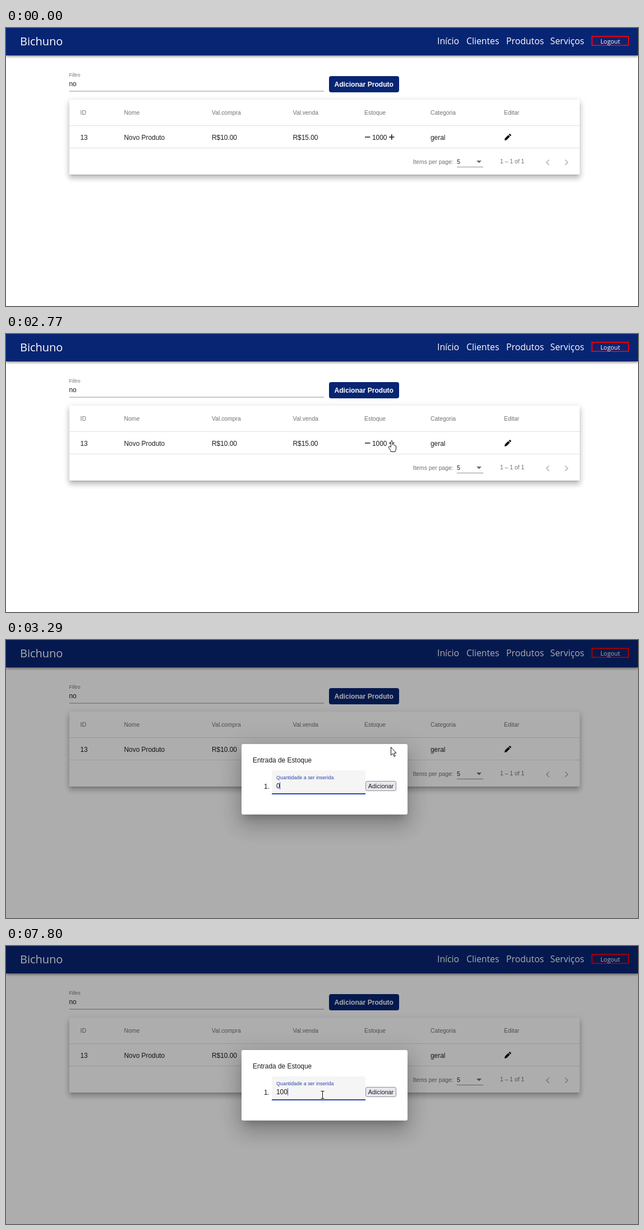
Recreate the animation shown at these times as an HTML page. Size 1127x497 px, loop 8000 ms.

```html
<!DOCTYPE html>
<html lang="pt-BR">
<head>
<meta charset="utf-8">
<title>Estoque</title>
<style>
  html, body { margin: 0; width: 100%; height: 100%; overflow: hidden; background: #fff; }
  div, svg { position: absolute; box-sizing: border-box; }
  svg { left: 0; top: 0; width: 1127px; height: 497px; }
  text { font: 11.9px "Liberation Sans", Arial, sans-serif; fill: #1c1c22; white-space: pre; }
  #nav { left: 0; top: 0; width: 1127px; height: 49px; background: #082573;
    box-shadow: 0 2px 4px rgba(0,0,0,.45); }
  #card { left: 113px; top: 128px; width: 910px; height: 134px; background: #fff; border-radius: 2px;
    box-shadow: 0 4px 4px -3px rgba(0,0,0,.2), 0 7px 9px 1px rgba(0,0,0,.14), 0 3px 12px 2px rgba(0,0,0,.12); }
  #dim { left: 0; top: 0; width: 1127px; height: 497px; background: rgba(0,0,0,.32); }
  #dialog { left: 0; top: 0; width: 1127px; height: 497px; transform-origin: 568px 249px; }
  #panel { left: 420px; top: 186px; width: 296px; height: 126px; background: #fff; border-radius: 3px;
    box-shadow: 0 10px 13px -6px rgba(0,0,0,.2), 0 21px 33px 3px rgba(0,0,0,.14), 0 8px 40px 7px rgba(0,0,0,.12); }
  .brand text, text.logout { font-family: "Open Sans", "Noto Sans", sans-serif; fill: #fff; }
  .brand text { font-size: 15.8px; }
  .brand text.title { font-size: 20px; }
  text.logout { font-size: 10.8px; }
  .head text { font-size: 10.4px; fill: #757075; }
  text.small { font-size: 8.95px; fill: #757075; }
  text.bold { font-size: 12.1px; font-weight: bold; fill: #fff; }
</style>
</head>
<body>
<div id="nav"></div>
<div id="card"></div>
<svg>
  <g class="brand">
    <text class="title" x="25" y="31">Bichuno</text>
    <text x="769" y="29">Início</text>
    <text x="821" y="29">Clientes</text>
    <text x="892" y="29">Produtos</text>
    <text x="970.5" y="29">Serviços</text>
  </g>
  <rect x="1045" y="15" width="65" height="16" fill="none" stroke="#e8000c" stroke-width="2"/>
  <text class="logout" x="1060" y="27.5">Logout</text>

  <text class="small" x="112.5" y="87">Filtro</text>
  <text x="112.5" y="104">no</text>
  <path d="M113 113H567" stroke="#8f8f8f"/>
  <rect x="576" y="86" width="125" height="29" rx="4" fill="#082573"/>
  <text class="bold" x="585.5" y="105">Adicionar Produto</text>

  <path d="M113 174.5H1023M113 214.5H1023" stroke="#e0e0e0"/>
  <g class="head">
    <text x="132.5" y="155">ID</text>
    <text x="210.5" y="155">Nome</text>
    <text x="367" y="155">Val.compra</text>
    <text x="511.5" y="155">Val.venda</text>
    <text x="639" y="155">Estoque</text>
    <text x="757" y="155">Categoria</text>
    <text x="888" y="155">Editar</text>
    <text x="725.5" y="243">Items per page:</text>
    <text x="881" y="242">1 – 1 of 1</text>
  </g>
  <text x="132.5" y="199.5">13</text>
  <text x="210.5" y="199.5">Novo Produto</text>
  <text x="367" y="199.5">R$10.00</text>
  <text x="511.5" y="199.5">R$15.00</text>
  <text x="653" y="199.5">1000</text>
  <text x="757" y="199.5">geral</text>
  <path d="M640 195H649.5M683 195H692.5M687.8 190.3V199.8" stroke="#1c1c22" stroke-width="1.7"/>
  <path d="M889 201L889.7 197.3 895.7 191.3 898.7 194.3 892.7 200.3ZM896.4 190.6L897.6 189.4Q898.5 188.8 899.4 189.6L900.5 190.7Q901.2 191.6 900.6 192.4L899.4 193.6Z" fill="#111"/>
  <text style="font-size:10.8px" x="804" y="243">5</text>
  <path d="M804 248.5H851" stroke="#8f8f8f"/>
  <path d="M839 237H848L843.5 241.5Z" fill="#7c666c"/>
  <path d="M968.5 235.5L963.8 240.2 968.5 244.9M997 235.5L1001.7 240.2 997 244.9" fill="none" stroke="#b8b8b8" stroke-width="1.7"/>
</svg>
<div id="dim"></div>
<div id="dialog">
  <div id="panel"></div>
  <svg>
    <text x="440" y="218.5">Entrada de Estoque</text>
    <text x="460" y="265.5">1.</text>
    <path d="M474 276V236Q474 233 477 233H638Q641 233 641 236V276Z" fill="#f5f5f5"/>
    <path d="M474 275.5H641" stroke="#8c8c8c"/>
    <path id="underline" stroke="#2a46b0" stroke-width="2"/>
    <text id="label" class="small" x="482" y="249">Quantidade a ser inserida</text>
    <text id="value" x="482" y="265"></text>
    <rect id="caret" y="254" width="1" height="13" fill="#2a46b0"/>
    <rect x="641.5" y="252.5" width="54" height="17" rx="2.5" fill="#e9e7ec" stroke="#8f8f9d"/>
    <text style="font-size:10.9px" x="645.8" y="265.2">Adicionar</text>
  </svg>
</div>
<svg>
  <circle id="click" cx="686" cy="191" r="10" fill="rgba(255,255,0,.47)"/>
  <path id="pointer" stroke="#111" stroke-linejoin="round"/>
</svg>
<script>
  const LOOP = 8000, OPEN = 2840, FOCUS = 3050;
  const el = id => document.getElementById(id);
  const clamp = v => Math.max(0, Math.min(1, v));
  const mix = (a, b, p) => a + (b - a) * p;
  const easeOut = p => 1 - (1 - p) ** 3;
  const show = (node, on) => node.style.visibility = on ? "visible" : "hidden";

  const shapes = {
    arrow: "M.5 .5V15L3.8 11.9 6 17.2 8.2 16.2 6 11.1H10Z",
    hand: "M.3 11V1.5Q1.8 -1.5 3.3 1.5V7Q5 5.7 5.8 7.6Q7.6 6.7 8 8.6Q9.5 8 9.5 10V14Q9.5 16 8 19.5H.5Q0 16.5 -3.6 12.5Q-4.2 9.8 -2 10.3Z",
    beam: "M-3 -6.5H3M-3 6.5H3M0 -6.5V6.5"
  };

  // Pointer moves: start, end, number of positions, from, to, easing
  const moves = [
    [600, 800, 4, [948, 406], [802, 323], p => p],
    [1280, 1560, 5, [790, 310], [711, 222], easeOut],
    [1630, 2040, 7, [706, 216], [688, 190], easeOut],
    [2110, 2240, 3, [688, 190], [686, 191], p => p],
    [3490, 4090, 9, [680, 195], [564, 266], p => p * p * (3 - 2 * p)]
  ];

  // Field contents: time, text, caret visible
  const typing = [
    [0, "0", false], [FOCUS, "0", true], [3560, "0", false], [4090, "0", true],
    [4620, "0", false], [5150, "0", true], [5680, "0", false], [5820, "00", true],
    [6250, "0", true], [6450, "", true], [6780, "1", false], [6850, "1", true],
    [7050, "10", true], [7270, "10", false], [7340, "100", false], [7800, "100", true]
  ];
  const latest = (list, t) => list.filter(item => item[0] <= t).pop();

  function drawPointer(t) {
    const move = latest(moves, t);
    show(el("pointer"), move);
    show(el("click"), t >= 2510 && t < 2770);
    if (!move) return;
    const [start, end, count, from, to, ease] = move;
    const step = Math.floor(clamp((t - start) / (end - start)) * (count - 1) + .02);
    const p = ease(step / (count - 1));
    const x = Math.round(mix(from[0], to[0], p)), y = Math.round(mix(from[1], to[1], p));
    const overPlus = t < OPEN && x < 694 && y < 202;
    const overField = t >= OPEN && x < 641 && y > 233;
    const kind = overPlus ? "hand" : overField ? "beam" : "arrow";
    el("pointer").setAttribute("d", shapes[kind]);
    el("pointer").setAttribute("fill", kind === "beam" ? "none" : "#fff");
    el("pointer").setAttribute("transform", `translate(${x + (kind === "beam" ? .5 : 0)} ${y})`);
  }

  // Inverse of cubic-bezier(0, 0, .2, 1) by bisection
  function decelerate(x) {
    let low = 0, high = 1;
    for (let i = 0; i < 20; i++) {
      const u = (low + high) / 2;
      if (.6 * (1 - u) * u * u + u ** 3 < x) low = u; else high = u;
    }
    return 3 * (1 - low) * low * low + low ** 3;
  }

  function drawDialog(t) {
    const open = t >= OPEN;
    show(el("dim"), open);
    el("dialog").style.display = open ? "block" : "none";
    if (!open) return;
    const held = OPEN + Math.floor((t - OPEN) / 70) * 70;
    const p = decelerate(clamp((held - 2828) / 150));
    el("dialog").style.opacity = p;
    el("dialog").style.transform = p < 1 ? `scale(${mix(.7, 1, p)})` : "none";

    const focus = easeOut(clamp((held - FOCUS) / 180));
    const half = 83.5 * focus;
    el("underline").setAttribute("d", `M${557.5 - half} 275H${557.5 + half}`);
    el("label").style.fill = `color-mix(in srgb, #2a46b0 ${focus * 100}%, #757075)`;

    const [, text, caret] = latest(typing, t);
    el("value").textContent = text;
    el("caret").setAttribute("x", Math.floor(482 + 6.7 * text.length));
    el("caret").setAttribute("opacity", caret ? 1 : 0);
  }

  function frame() {
    const t = performance.now() % LOOP;
    drawPointer(t);
    drawDialog(t);
    requestAnimationFrame(frame);
  }
  frame();
</script>
</body>
</html>
```
